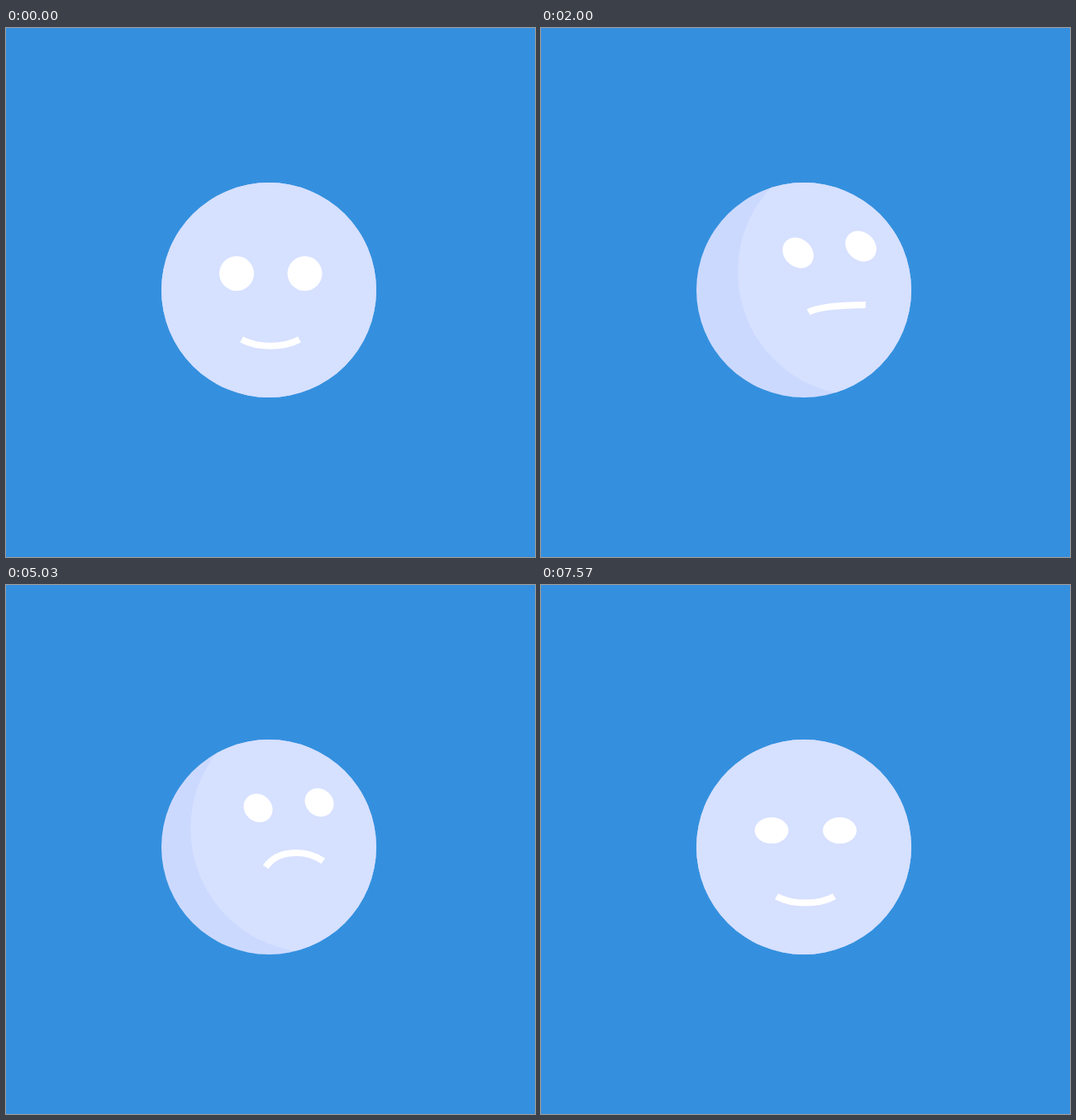
Recreate the animation shown at these times as an HTML page. Size 640x640 px, loop 7610 ms.

```html
<!DOCTYPE html>
<html lang="en">
<head>
<meta charset="utf-8">
<title>Moody face</title>
<style>
  html, body { margin: 0; width: 100%; height: 100%; overflow: hidden; background: #3490de; }
  svg { display: block; width: 100%; height: 100%; }
</style>
</head>
<body>
<svg viewBox="0 0 640 640">
  <clipPath id="head"><circle cx="318" cy="317" r="130"/></clipPath>
  <rect width="640" height="640" fill="#3490de"/>
  <circle cx="318" cy="317" r="130" fill="#ccd9ff"/>
  <g clip-path="url(#head)"><circle id="light" r="150" fill="#d6e0ff"/></g>
  <circle id="eyeL" r="1" fill="#fff"/>
  <circle id="eyeR" r="1" fill="#fff"/>
  <path id="mouth" fill="none" stroke="#fff" stroke-width="8"/>
</svg>
<script>
const LOOP = 7610;
const $ = id => document.getElementById(id);
const [light, eyeL, eyeR, mouth] = ['light', 'eyeL', 'eyeR', 'mouth'].map($);

// Poses: light x y, left eye x y, right eye x y, mouth left x y, mouth right x y
const FRONT = [318, 317, 279, 297, 361.5, 297, 285, 376.8, 355, 376.8];
const RIGHT = [388, 295, 311, 272, 387, 264, 323.5, 343.8, 392.8, 335];
const LEFT = [254.5, 293, 256.3, 252.2, 315, 255.7, 238.5, 320.7, 310.5, 325.6];

// Mouth handles, relative to the ends
const CALM = [19, 10.5, -19, 10.5];
const SMILE = [17, 18, -14, 27];
const FROWN = [13, -24, -21, -16];
const FLAT = [24, 1.6, -24, -1.6];

// Eye shapes as symmetric matrices: xx, xy, yy
const ROUND = [21, 0, 21];
const WIDE = [21.6, 2.7, 21.4];
const SMALL = [17.5, 1.4, 17.2];
const SQUINT = [19, 0.8, 10.2];
const TILTED = [17.5, -2, 17.2];
const SHUT = [19, 0.1, 4];

const smooth = u => u * u * (3 - 2 * u);
const late = u => smooth(u ** 1.74);
const cubicIn = u => u ** 3;

// Each step: start, end, destination, easing
const pose = [FRONT, [0, 1220, RIGHT], [4400, 5960, LEFT, late], [5960, 7610, FRONT]];
const lips = [CALM, [0, 1220, SMILE], [1300, 2500, FROWN], [4400, 5960, FLAT, late], [5960, 7610, CALM]];
const eyes = [ROUND, [0, 1220, WIDE], [1300, 2400, SMALL], [2370, 2930, SQUINT], [3400, 3870, SMALL],
  [4400, 5960, TILTED, late], [6300, 6850, SHUT], [7250, 7610, ROUND, cubicIn]];

function at([first, ...steps], t) {
  return steps.reduce((v, [start, end, to, ease = smooth]) => {
    const p = ease(Math.min(1, Math.max(0, (t - start) / (end - start))));
    return v.map((a, i) => a + (to[i] - a) * p);
  }, first);
}

function draw(t) {
  const [lx, ly, ax, ay, bx, by, x0, y0, x1, y1] = at(pose, t);
  const [h0, k0, h1, k1] = at(lips, t);
  const [xx, xy, yy] = at(eyes, t);
  const shape = (x, y) => `matrix(${xx} ${xy} ${xy} ${yy} ${x} ${y})`;
  light.setAttribute('cx', lx);
  light.setAttribute('cy', ly);
  eyeL.setAttribute('transform', shape(ax, ay));
  eyeR.setAttribute('transform', shape(bx, by));
  mouth.setAttribute('d', `M${x0} ${y0}C${x0 + h0} ${y0 + k0} ${x1 + h1} ${y1 + k1} ${x1} ${y1}`);
}

let origin;
function tick(now) {
  origin ??= now;
  draw((now - origin) % LOOP);
  requestAnimationFrame(tick);
}
draw(0);
requestAnimationFrame(tick);
</script>
</body>
</html>
```
